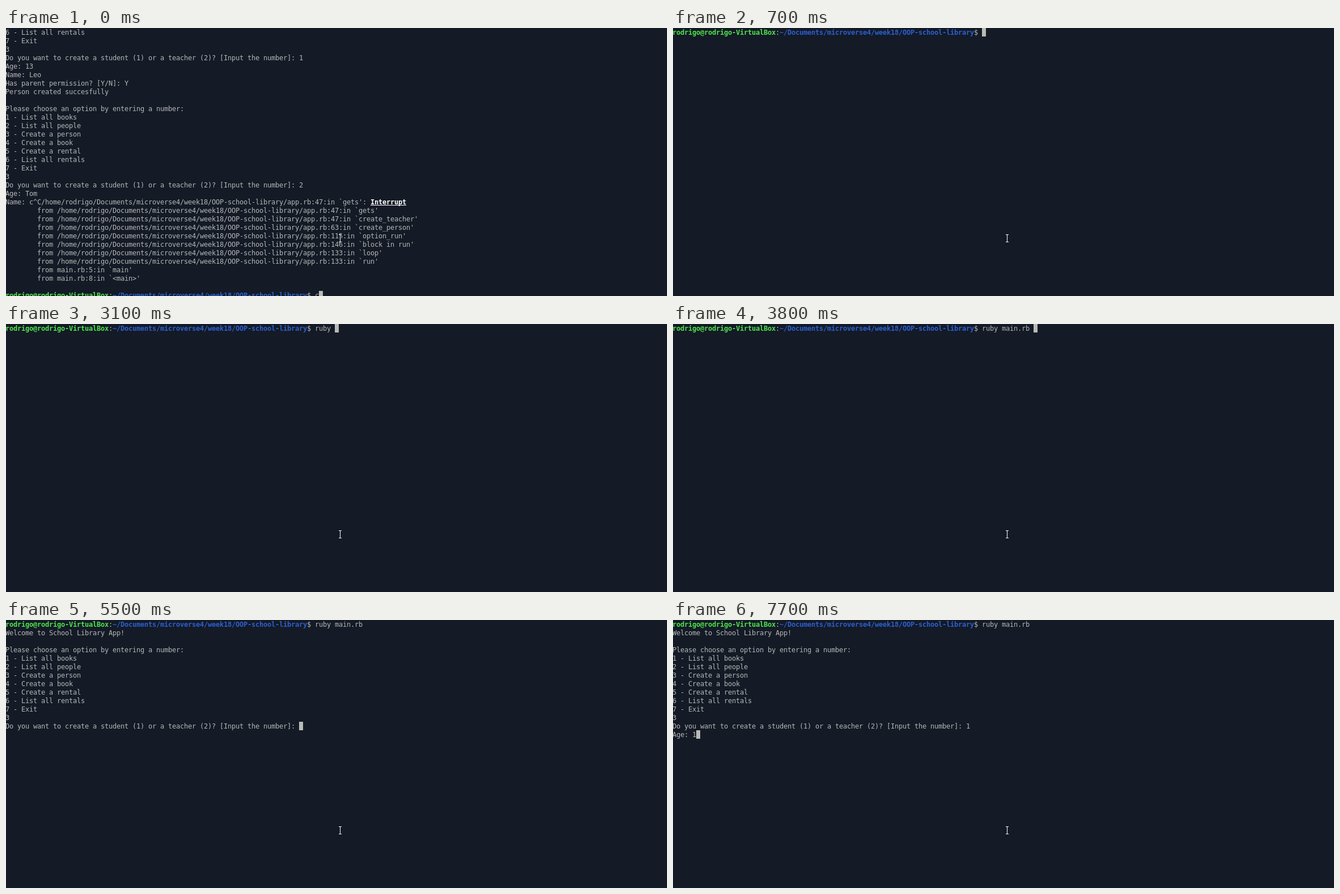
Write an HTML page with a canvas that moves like this. It is 1166 px wide and 474 px high and loops after 8000 ms.

```html
<!DOCTYPE html>
<html lang="en">
<head>
<meta charset="utf-8">
<title>Terminal session</title>
<style>
html, body { margin: 0; width: 100%; height: 100%; overflow: hidden; background: #141a26; }
canvas { display: block; }
</style>
</head>
<body>
<canvas id="screen" width="1166" height="474"></canvas>
<script>
const ctx = document.getElementById('screen').getContext('2d');
const CELL_W = 7, CELL_H = 15, LEFT = -1, BASE = 12, LOOP = 8000;
const BG = '#141a26', CURSOR = '#b9bbb5';
const FONT = '12px "DejaVu Sans Mono", monospace';

// "§" plus a key switches the text style
const STYLES = {
  n: { color: '#b5b8b5' },
  g: { color: '#4ee64b', bold: true },
  b: { color: '#2b60d0', bold: true },
  u: { color: '#ffffff', bold: true, underline: true }
};

const prompt = '§grodrigo@rodrigo-VirtualBox§n:§b~/Documents/microverse4/week18/OOP-school-library§n$ ';
const app = '/home/rodrigo/Documents/microverse4/week18/OOP-school-library/app.rb:';
const question = 'Do you want to create a student (1) or a teacher (2)? [Input the number]: ';
const menu = `Please choose an option by entering a number:
1 - List all books
2 - List all people
3 - Create a person
4 - Create a book
5 - Create a rental
6 - List all rentals
7 - Exit
`;
const indent = ' '.repeat(8);
const trace = [
  [47, 'gets'], [47, 'create_teacher'], [63, 'create_person'], [115, 'option_run'],
  [146, 'block in run'], [133, 'loop'], [133, 'run']
].map(([line, name]) => `${indent}from ${app}${line}:in \`${name}'\n`).join('');

const history = `6 - List all rentals
7 - Exit
3
${question}1
Age: 13
Name: Leo
Has parent permission? [Y/N]: Y
Person created succesfully

${menu}3
${question}2
Age: Tom
Name: c^C${app}47:in \`gets': §uInterrupt§n
${trace}${indent}from main.rb:5:in \`main'
${indent}from main.rb:8:in \`<main>'

${prompt}`;

const started = prompt + 'ruby main.rb\n';
const welcome = started + 'Welcome to School Library App!\n\n' + menu;
const asked = welcome + '3\n' + question;

const steps = [
  [0, history + 'c'],
  [100, history + 'cl'],
  [200, history + 'cle'],
  [500, history + 'clea'],
  [600, history + 'clear'],
  [700, prompt],
  [2300, prompt + 'r'],
  [2800, prompt + 'ruby'],
  [3100, prompt + 'ruby '],
  [3400, prompt + 'ruby m'],
  [3600, prompt + 'ruby ma'],
  [3800, prompt + 'ruby main.rb '],
  [4000, started],
  [4200, welcome],
  [5300, welcome + '3'],
  [5500, asked],
  [6600, asked + '1'],
  [6800, asked + '1\nAge: '],
  [7700, asked + '1\nAge: 1']
];

function setStyle(key) {
  const style = STYLES[key];
  ctx.fillStyle = style.color;
  ctx.font = (style.bold ? 'bold ' : '') + FONT;
  return style;
}

function drawPointer() {
  ctx.fillStyle = BG;
  ctx.fillRect(588, 365, 3, 14);
  ctx.fillStyle = '#ffffff';
  ctx.fillRect(589, 366, 1, 12);
  ctx.fillRect(587, 365, 5, 1);
  ctx.fillRect(587, 378, 5, 1);
}

function drawScreen(text) {
  ctx.fillStyle = BG;
  ctx.fillRect(0, 0, 1166, 474);
  let x = LEFT, y = 0, style = setStyle('n');
  for (let i = 0; i < text.length; i++) {
    const ch = text[i];
    if (ch === '§') {
      style = setStyle(text[++i]);
    } else if (ch === '\n') {
      x = LEFT;
      y += CELL_H;
    } else {
      ctx.fillText(ch, x, y + BASE);
      if (style.underline) ctx.fillRect(x, y + BASE + 1, CELL_W, 1);
      x += CELL_W;
    }
  }
  ctx.fillStyle = CURSOR;
  ctx.fillRect(x, y, CELL_W, CELL_H);
  drawPointer();
}

const start = performance.now();
function tick() {
  const t = (performance.now() - start) % LOOP;
  drawScreen(steps.findLast(([time]) => time <= t)[1]);
  requestAnimationFrame(tick);
}
tick();
</script>
</body>
</html>
```
